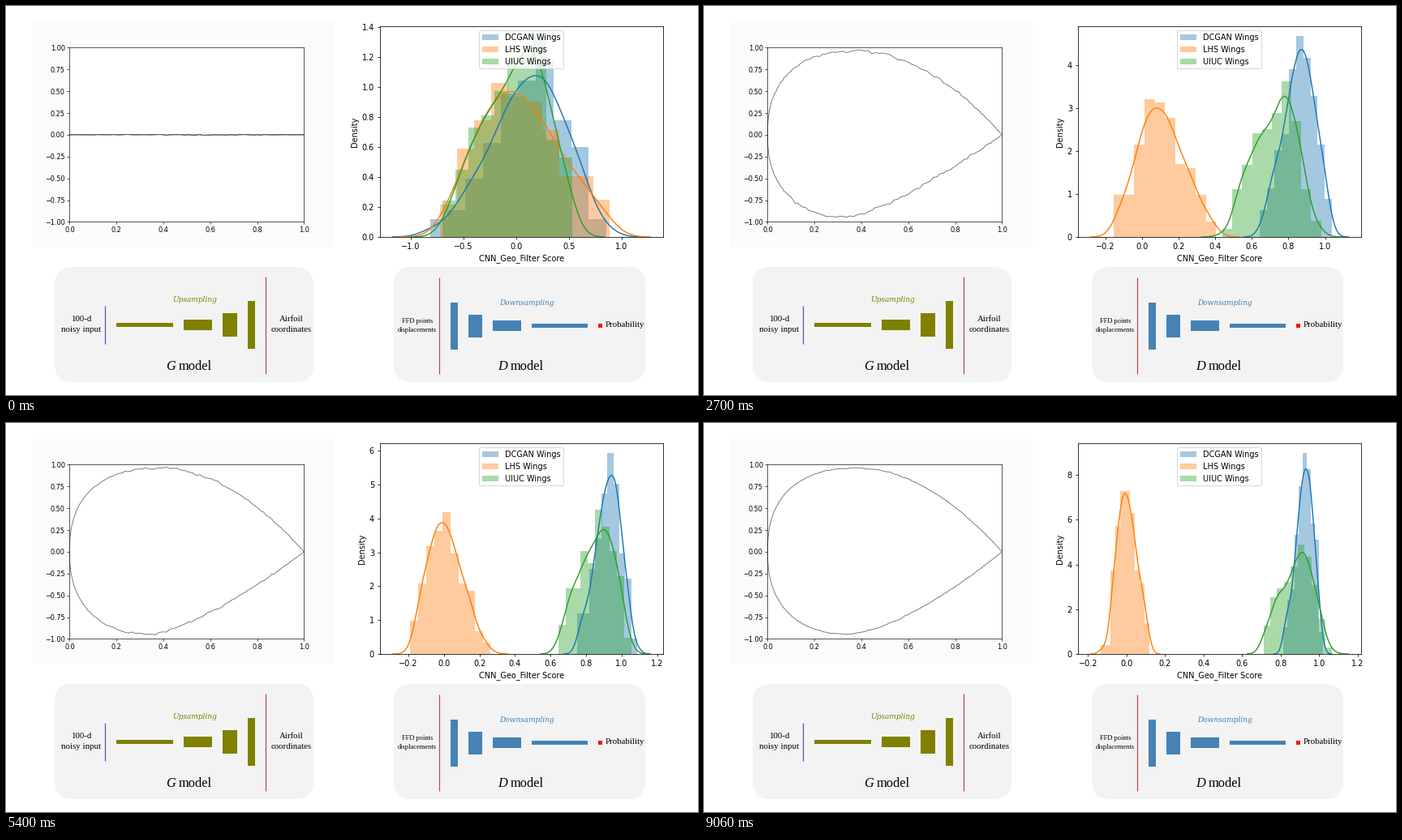
Recreate the animation shown at these times as a matplotlib script. Size 853 by 480 pixels, loop 9.12 s.

```python
import numpy as np
import matplotlib.pyplot as plt
from matplotlib.animation import FuncAnimation
from matplotlib.patches import FancyBboxPatch, Rectangle

W, H, DPI = 853, 480, 64
FRAMES, STEP = 152, 60
PT = 72 / DPI  # points per pixel
SAMPLES, BINS = 200, 10

# Score clusters: mode and spread at a few times, plus a side bump given by
# its offset (in spreads) and share of the samples
TIMES = [0, 33, 55, 75, 106, 128, 151]
SERIES = [
    dict(name="DCGAN Wings", color="C0", offset=-1.8, share=.15,
         mode=[.2, .88, .88, .88, 1.01, .965, .935],
         spread=[.33, .073, .088, .07, .064, .041, .043]),
    dict(name="LHS Wings", color="C1", offset=1.7, share=.25,
         mode=[-.1, .1, .03, -.04, -.01, .01, -.015],
         spread=[.34, .107, .114, .082, .085, .048, .046]),
    dict(name="UIUC Wings", color="C2", offset=-2.2, share=.35,
         mode=[.16, .77, .81, .87, .96, .96, .93],
         spread=[.22, .08, .089, .073, .073, .063, .062]),
]


def progress(n):
    """Training time: fast at first, then even."""
    early = TIMES[1]
    return early * (n / early) ** .45 if n < early else n


def scores(s, time, rng):
    """Evenly spread draws from a two-bump mixture, with some jitter."""
    mode = np.interp(time, TIMES, s["mode"])
    spread = np.interp(time, TIMES, s["spread"])
    z = np.linspace(-6, 6, 600)
    pdf = ((1 - s["share"]) * np.exp(-z * z / 2)
           + s["share"] * np.exp(-(z - s["offset"]) ** 2 / 2))
    cdf = np.cumsum(pdf) / pdf.sum()
    jitter = 12
    u = (np.arange(SAMPLES) + jitter * rng.random(SAMPLES)) / (SAMPLES + jitter)
    return mode + spread * np.interp(u, cdf, z)


def density(data):
    """Gaussian kernel estimate with Scott's bandwidth."""
    band = data.std() * SAMPLES ** -.2
    x = np.linspace(data.min() - 3 * band, data.max() + 3 * band, 160)
    z = (x[:, None] - data) / band
    return x, np.exp(-z * z / 2).mean(axis=1) / (band * np.sqrt(2 * np.pi))


def surface(height, crest, nose, tail, rough, rng):
    """Rounded nose up to the crest, power-law tail behind it."""
    x = (1 - np.cos(np.linspace(0, np.pi, 100))) / 2
    front = (1 - np.clip(1 - x / crest, 0, 1) ** nose) ** (1 / nose)
    back = 1 - np.clip((x - crest) / (1 - crest), 0, 1) ** tail
    noise = rough * rng.standard_normal(x.size) * np.sin(np.pi * x) ** .5
    return x, height * np.where(x < crest, front, back) + noise


fig = plt.figure(figsize=(W / DPI, H / DPI), dpi=DPI, facecolor="white")


def add_axes(x, y, w, h, k):
    """Axes placed in pixels, with default styling scaled by k."""
    ax = fig.add_axes([x / W, 1 - (y + h) / H, w / W, h / H])
    ax.tick_params(labelsize=10 * k, length=3.5 * k, width=.8 * k, pad=3.5 * k)
    for side in ax.spines.values():
        side.set_linewidth(.8 * k)
    return ax


# Static backdrop in pixel coordinates
bg = fig.add_axes([0, 0, 1, 1])
bg.set(xlim=(0, W), ylim=(H, 0))
bg.axis("off")


def box(x0, y0, x1, y1, color):
    bg.add_patch(Rectangle((x0, y0), x1 - x0, y1 - y0, fc=color, lw=0))


def panel(x0, y0, x1, y1):
    bg.add_patch(FancyBboxPatch((x0, y0), x1 - x0, y1 - y0, fc="#f3f3f3", lw=0,
                                boxstyle="round,pad=0,rounding_size=22"))


def rule(x, y0, y1, color):
    bg.plot([x, x], [y0, y1], color=color, lw=1.2 * PT, solid_capstyle="butt")


def label(x, y, s, px, ha="center", color="black", family="Liberation Serif",
          style="normal"):
    bg.text(x, y, s, fontsize=px * PT, ha=ha, va="baseline", color=color,
            family=family, style=style)


OLIVE, STEEL, BRICK = "#808000", "#4682b4", "#b44a4a"

box(32, 20, 405, 297, "#fbfbfb")
panel(60, 322, 379, 464)
panel(478, 322, 788, 464)

for b in [(136, 391, 206, 396), (219, 387, 254, 400),
          (267, 379, 285, 408), (298, 364, 307, 423)]:
    box(*b, OLIVE)
for b in [(548, 366, 557, 424), (570, 381, 587, 409),
          (600, 388, 635, 401), (648, 392, 717, 397)]:
    box(*b, STEEL)
box(730, 392, 735, 397, "#e81c1c")

rule(122.5, 370, 417, "#5a4bb0")
rule(320.5, 334, 454, BRICK)
rule(534.5, 335, 454, BRICK)

label(93, 389, "100-d", 10.9)
label(93, 402, "noisy input", 10.9)
label(352, 389, "Airfoil", 10.8)
label(352, 402, "coordinates", 10.8)
label(507, 391, "FFD points", 8.4)
label(507, 402, "displacements", 8.4)
label(763, 396, "Probability", 10.8)
label(232.5, 365, "Upsampling", 9, color=OLIVE, family="DejaVu Serif", style="italic")
label(641.5, 369, "Downsampling", 9, color=STEEL, family="DejaVu Serif", style="italic")
for x, letter in [(197, "G"), (606, "D")]:
    label(x, 449, letter, 16.4, ha="left", style="italic")
    label(x + 16, 449, "model", 16.4, ha="left")

# Airfoil plot
foil_k, dens_k = .583 * 100 / DPI, .7036 * 100 / DPI
foil = add_axes(78.4, 51.4, 289, 215, foil_k)
foil.set(xlim=(0, 1), ylim=(-1, 1), xticks=np.arange(6) / 5,
         yticks=np.arange(-4, 5) / 4)
outline, = foil.plot([], [], color="#5c6274", lw=.8 * PT)

# Score distribution plot
dens = add_axes(460.8, 25, 349.2, 260, dens_k)
dens.set_xlabel("CNN_Geo_Filter Score", fontsize=10 * dens_k, labelpad=4 * dens_k)
dens.set_ylabel("Density", fontsize=10 * dens_k, labelpad=4 * dens_k)
bars, curves = [], []
for s in SERIES:
    bars.append(dens.bar(np.arange(BINS), np.ones(BINS), color=s["color"],
                         alpha=.4, lw=0, label=s["name"]))
    curves.append(dens.plot([], [], color=s["color"], lw=1.5 * dens_k)[0])
legend = dens.legend(handles=bars, loc="upper center", fontsize=10 * dens_k)
legend.get_frame().set_linewidth(dens_k)


def draw_foil(n, time, rng):
    done = n / (FRAMES - 1)
    grown = min(1, time / TIMES[1])
    rough = (.003 + .010 * (1 - done)) * max(grown, .15)
    xu, yu = surface(.96 * grown, .39, 2.45, 1.9, rough, rng)
    xl, yl = surface(-.945 * grown, .35, 2.35, 1.2 + .3 * done, rough, rng)
    outline.set_data(np.r_[xu[::-1], xl], np.r_[yu[::-1], yl])


def draw_scores(time, rng):
    top, ends = 0, []
    for s, group, curve in zip(SERIES, bars, curves):
        data = scores(s, time, rng)
        heights, edges = np.histogram(data, BINS, density=True)
        for bar, x, w, h in zip(group, edges, np.diff(edges), heights):
            bar.set_bounds(x, 0, w, h)
        x, y = density(data)
        curve.set_data(x, y)
        top = max(top, heights.max(), y.max())
        ends += [x[0], x[-1]]
    margin = .05 * (max(ends) - min(ends))
    dens.set_xlim(min(ends) - margin, max(ends) + margin)
    dens.set_ylim(0, 1.05 * top)


def draw(n):
    rng = np.random.default_rng(500 + n)
    time = progress(n)
    draw_foil(n, time, rng)
    draw_scores(time, rng)
    return [outline, *curves]


anim = FuncAnimation(fig, draw, frames=FRAMES, interval=STEP, repeat=True,
                     repeat_delay=0, init_func=lambda: draw(0), blit=False)
plt.show()
```
